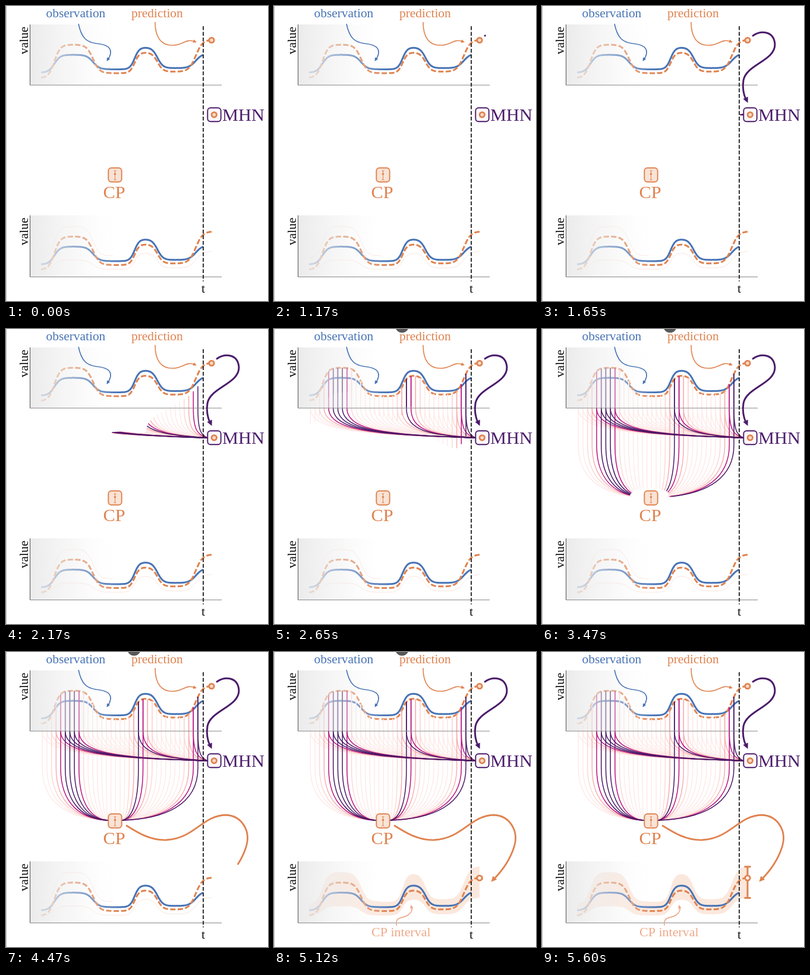
Animation of 441x496 px, one loop 6600 ms. Source, as an HTML page with a canvas:

```html
<!DOCTYPE html>
<html lang="en">
<head>
<meta charset="utf-8">
<title>Prediction and interval</title>
<style>
html, body { margin: 0; width: 100%; height: 100%; overflow: hidden; background: #fff; }
canvas { display: block; }
svg { position: absolute; left: 0; top: 0; }
</style>
</head>
<body>
<canvas id="stage" width="441" height="496"></canvas>
<svg width="0" height="0"><path id="ruler"/></svg>
<script>
const LOOP = 6600;
const BLUE = '#4773b5', ORANGE = '#df8350', PALE = '#eeaa8a', PURPLE = '#4b1c6b';
const STRAND_COLORS = ['#fdebe9', '#fcd8d5', '#f8afb0', '#b9137f', '#491a66'];
const SERIF = '"Liberation Serif", "Times New Roman", serif';
const LOWER = 322.5;

const ctx = document.getElementById('stage').getContext('2d');
const ruler = document.getElementById('ruler');
const clamp = v => Math.max(0, Math.min(1, v));
const progress = (t, from, to) => clamp((t - from) / (to - from));

// Every signal steps between plateaus at the same smooth edges
const EDGES = [81.5, 146.5, 216.5, 255, 319.5];
const SOFTNESS = [5, 5.5, 4, 4.7, 5.8];
const signal = (...plateaus) => x => EDGES.reduce((y, edge, i) =>
  y + (plateaus[i + 1] - plateaus[i]) / (1 + Math.exp((edge - x) / SOFTNESS[i])), plateaus[0]);

const observed = signal(112, 82, 106.5, 69.5, 104.5, 79.5);
const predicted = signal(121, 65, 113, 78, 110.5, 56.5);
const upper = signal(424, 370.5, 420, 372.5, 416, 360);
const lower = signal(442, 427, 442.5, 415.5, 440.5, 412.5);

function curve(f, to, dy = 0) {
  const path = new Path2D();
  for (let x = 59; x <= to; x++) path.lineTo(x, f(x) + dy);
  return path;
}

function route(d) {
  ruler.setAttribute('d', d);
  return { path: new Path2D(d), length: ruler.getTotalLength() };
}

// Strands rise from the network box to the curve, then fall from the curve to the CP box.
// They are strongest around similar moments, given as centre and half width.
const FOCUS = [[323, 0], [225, 0], [106, 8]];

function strand(x) {
  const distance = Math.min(...FOCUS.map(([c, half]) => Math.max(0, Math.abs(x - c) - half)));
  const level = Math.max(0, Math.floor(4.35 - distance / 7));
  const top = predicted(x);
  const end = Math.max(172, Math.min(195, x));
  const rise = route(`M339 183C${x + (339 - x) * .34} 178 ${x} 172 ${x} 133V${top}`);
  const fall = route(`M${x} ${top}V195C${x} 258 ${x + (end - x) * .45} 281 ${end} 283`);
  const turn = 1590 + Math.min(930, 370 + 2.6 * rise.length);
  return { level, rise, fall, turn };
}
const strands = Array.from({ length: 35 }, (_, i) => strand(323 - 7.7 * i))
  .sort((a, b) => a.level - b.level);

const networkArrow = route('M355 50C368 41 390 41 392 64C393 92 344 98 339 125C337 138 339 148 343.5 158');
const intervalArrow = route('M203 292C222 304 243 317 270 316C318 313 330 275 370 274C396 275 413 300 404 328C397 350 384 368 369 383');
const observedArrow = new Path2D('M122 30C127 54 136 61 152 63C175 65 182 74 171 91');
const predictedArrow = new Path2D('M251 27C251 54 262 67 282 66C300 65 302 54 319 60');
const bandArrow = new Path2D('M206 460C204 443 217 449 226 442C233 437 233 432 231 428');
const observedTop = curve(observed, 332), observedLow = curve(observed, 332, LOWER);
const predictedTop = curve(predicted, 346), predictedLow = curve(predicted, 346, LOWER);
const upperEdge = curve(upper, 180), lowerEdge = curve(lower, 346);
const band = curve(upper, 346);
for (let x = 346; x >= 59; x--) band.lineTo(x, lower(x));

function stroke(path, color, width, dash = []) {
  ctx.strokeStyle = color;
  ctx.lineWidth = width;
  ctx.setLineDash(dash);
  ctx.stroke(path);
  ctx.setLineDash([]);
}

function line(x0, y0, x1, y1, color, width, dash) {
  stroke(new Path2D(`M${x0} ${y0}L${x1} ${y1}`), color, width, dash);
}

function grow(r, p, color, width) {
  if (p > 0) stroke(r.path, color, width, p < 1 ? [r.length * p, r.length + 9] : []);
}

function head(x, y, angle, size, color) {
  ctx.save();
  ctx.translate(x, y);
  ctx.rotate(angle);
  ctx.fillStyle = color;
  ctx.fill(new Path2D(`M0 0L${-size} ${-size * .48}L${-size} ${size * .48}Z`));
  ctx.restore();
}

function text(s, x, y, size, color, align = 'left') {
  ctx.font = `${size}px ${SERIF}`;
  ctx.fillStyle = color;
  ctx.textAlign = align;
  ctx.fillText(s, x, y);
}

function disc(x, y, r, fill) {
  ctx.fillStyle = fill;
  ctx.beginPath();
  ctx.arc(x, y, r, 0, 2 * Math.PI);
  ctx.fill();
}

function marker(x, y, core = '#f9dac7') {
  disc(x, y, 5.6, ORANGE);
  disc(x, y, 2.8, core);
}

function box(x, y, w, h, fill, edge) {
  ctx.beginPath();
  ctx.roundRect(x, y, w, h, 5);
  ctx.fillStyle = fill;
  ctx.fill();
  stroke(new Path2D(), edge, 1.9);
  ctx.stroke();
}

function errorBar(x, high, low, half, width) {
  line(x, high, x, low, ORANGE, width);
  line(x - half, high, x + half, high, ORANGE, width);
  line(x - half, low, x + half, low, ORANGE, width);
}

// The fade lies over the signals, so that the past looks washed out
function panel(top, bottom) {
  const fade = ctx.createLinearGradient(41, 0, 195, 0);
  fade.addColorStop(0, 'rgba(234,234,234,.95)');
  fade.addColorStop(.5, 'rgba(240,240,240,.45)');
  fade.addColorStop(1, 'rgba(255,255,255,0)');
  ctx.fillStyle = fade;
  ctx.fillRect(41, top, 155, bottom - top);
  line(40.5, top, 40.5, bottom, '#666', 1.2);
  line(40, bottom, 363, bottom, '#888', 1.2);
  ctx.save();
  ctx.translate(36.5, top + 27);
  ctx.rotate(-Math.PI / 2);
  text('value', 0, 0, 21.4, '#111', 'center');
  ctx.restore();
}

function drawLowerChart(t) {
  stroke(upperEdge, '#fae6de', 1);
  stroke(lowerEdge, '#fae6de', 1);
  ctx.globalAlpha = progress(t, 4600, 4850);
  ctx.fillStyle = '#fbe8dd';
  ctx.fill(band);
  ctx.globalAlpha = 1;
  stroke(observedLow, BLUE, 3);
  stroke(predictedLow, ORANGE, 3, [9, 3.6]);
  panel(352, 455.5);
}

function drawUpperChart(t) {
  stroke(observedTop, BLUE, 3);
  stroke(predictedTop, ORANGE, 3, [9, 3.6]);
  for (const s of strands) {
    const color = STRAND_COLORS[s.level];
    grow(s.rise, progress(t, 1590, s.turn) ** 1.5, color, 1.5);
    grow(s.fall, progress(t, s.turn, 3590) ** .85, color, 1.5);
  }
  panel(31, 133);
}

function drawLabels() {
  line(332, 34, 332, 463, '#111', 1.7, [6.5, 3]);
  text('t', 332, 482, 22, '#111', 'center');
  text('observation', 67.5, 19, 21.4, BLUE);
  stroke(observedArrow, BLUE, 1.6);
  head(169.5, 93, 2.1, 6, BLUE);
  text('prediction', 211, 19, 21.4, ORANGE);
  stroke(predictedArrow, ORANGE, 1.6);
  head(321, 61, .35, 6, ORANGE);
  marker(346, 57.5);
}

function drawFlow(t) {
  ctx.lineCap = 'round';
  const toNetwork = progress(t, 1170, 1590);
  grow(networkArrow, toNetwork, PURPLE, 3);
  if (toNetwork === 1) head(346.5, 163, 1.15, 9.5, PURPLE);
  const toInterval = progress(t, 3560, 4580);
  grow(intervalArrow, toInterval, ORANGE, 2.8);
  if (toInterval === 1) head(365.5, 386.5, 2.3, 9.5, ORANGE);
  ctx.lineCap = 'butt';

  box(339.3, 171.3, 22.4, 23, '#fcf8fb', PURPLE);
  marker(350.3, 182.8);
  text('MHN', 364, 193, 30.4, PURPLE);

  box(172.3, 272.3, 22.4, 23.4, '#f9e3d6', ORANGE);
  errorBar(183.5, 277, 292, 2, 1);
  disc(183.5, 282.5, 1.8, ORANGE);
  text('CP', 163.5, 323, 30.4, ORANGE);
}

function drawInterval(t) {
  ctx.globalAlpha = progress(t, 4640, 4930);
  text('CP interval', 164, 478, 22, PALE);
  stroke(bandArrow, PALE, 1.7);
  head(230.5, 425, -1.8, 6, PALE);
  ctx.globalAlpha = 1;

  const bar = progress(t, 5100, 5580);
  if (bar > 0) {
    errorBar(346, 380 - 19 * bar, 380 + 33.5 * bar, 5.5, 3);
    marker(346, 380, '#fdf1ea');
  }
}

function draw(t) {
  ctx.fillStyle = '#fff';
  ctx.fillRect(0, 0, 441, 496);
  ctx.lineJoin = 'round';
  line(.5, 0, .5, 496, '#bdbdbd', 1);
  drawLowerChart(t);
  drawUpperChart(t);
  drawLabels();
  drawFlow(t);
  drawInterval(t);
  if (t >= 2400 && t < 5400) disc(215.5, -5, 11.3, '#58585a');
}

const start = performance.now();
function frame() {
  draw((performance.now() - start) % LOOP);
  requestAnimationFrame(frame);
}
frame();
</script>
</body>
</html>
```
